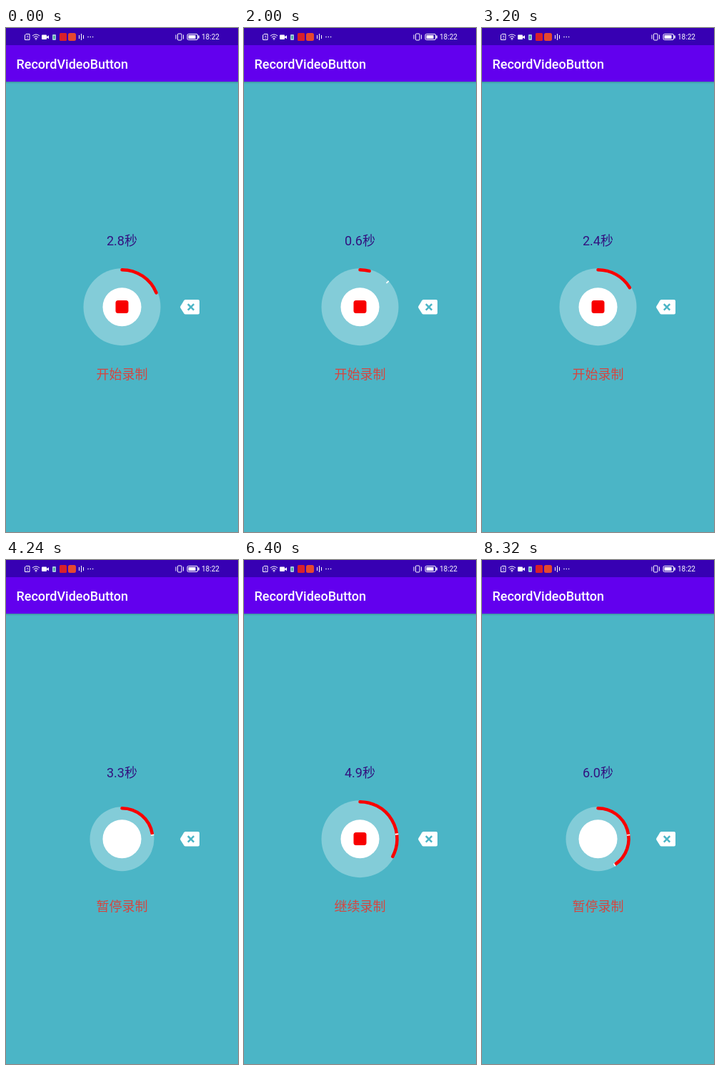
An HTML page that plays this animation: 325 by 705 pixels, repeating every 8400 ms.

```html
<!DOCTYPE html>
<html lang="zh">
<head>
<meta charset="utf-8">
<title>RecordVideoButton</title>
<style>
html, body { margin: 0; width: 100%; height: 100%; overflow: hidden; background: #4bb5c6; }
svg { display: block; width: 100%; height: 100%; }
text { font-family: Roboto, "Noto Sans CJK SC", "Noto Sans CJK", sans-serif; }
.big { font-size: 18px; text-anchor: middle; }
.line { fill: none; stroke: #fff; stroke-width: 1; }
#arcs path { fill: none; stroke-width: 4.5; }
.red { stroke: #f80000; stroke-linecap: round; }
.tick { stroke: #fff; }
</style>
</head>
<body>
<svg viewBox="0 0 325 705" preserveAspectRatio="none">
  <defs>
    <linearGradient id="shade" x2="0" y2="1">
      <stop stop-color="#000" stop-opacity=".2"/>
      <stop offset="1" stop-color="#000" stop-opacity="0"/>
    </linearGradient>
  </defs>
  <rect width="325" height="705" fill="#4bb5c6"/>
  <rect y="75" width="325" height="3" fill="url(#shade)"/>
  <rect y="24" width="325" height="51" fill="#6200ee"/>
  <rect width="325" height="24" fill="#3700b3"/>

  <g id="status" fill="#fff">
    <path class="line" d="M28 8.5h5v8h-6.5v-6.500z"/>
    <path class="line" d="M30 10.500v2.500M30 14v1"/>
    <path class="line" d="M37 11q5-4 10 0M38.700 13q3.300-2.600 6.600 0M40.300 15q1.700-1.400 3.400 0"/>
    <circle cx="42" cy="16" r=".8"/>
    <rect x="50" y="9.500" width="7" height="6.500" rx="1"/>
    <path d="M56.500 12.500l3.500-2.300v5l-3.500-2.300z"/>
    <rect x="65" y="9" width="5" height="8" rx="1" fill="#a5c8df"/>
    <rect x="66.500" y="11" width="2" height="4" fill="#3da88b"/>
    <rect x="75" y="7" width="10" height="11" rx="1.500" fill="#d9202b"/>
    <rect x="87" y="7" width="11" height="11" rx="2.500" fill="#e5482f"/>
    <path class="line" d="M102.500 10v5M105.500 8v9M108.500 10v5"/>
    <circle cx="115" cy="12.500" r=".8"/><circle cx="118.300" cy="12.500" r=".8"/><circle cx="121.600" cy="12.500" r=".8"/>
    <rect class="line" x="240.500" y="8" width="5.500" height="9" rx="1"/>
    <path class="line" d="M238 9.500v6M248.500 9.500v6"/>
    <rect class="line" x="254" y="8.500" width="14.500" height="8" rx="1.500"/>
    <rect x="255.500" y="10" width="10" height="5"/>
    <rect x="269.300" y="10.500" width="1.500" height="4"/>
    <text x="274" y="16" font-size="10">18:22</text>
  </g>

  <text x="14.500" y="56.500" font-size="18" font-weight="500" fill="#fff">RecordVideoButton</text>
  <text id="time" class="big" x="162.500" y="304" fill="#33127f"></text>
  <text id="label" class="big" x="162.500" y="491" fill="#d6453f"></text>

  <circle id="ring" cx="162.500" cy="390.200" fill="#fff" fill-opacity=".31"/>
  <circle cx="162.500" cy="390.200" r="27" fill="#fff"/>
  <rect id="stop" x="153.500" y="381" width="18" height="18" rx="3.500" fill="#f80000"/>
  <g id="arcs"></g>

  <path d="M251.500 380H269q2 0 2 2v16.500q0 2-2 2H251.500q-1.300 0-2.200-1.200l-4.800-7.600q-.8-1.400 0-2.800l4.800-7.600q.9-1.300 2.200-1.300z" fill="#fff"/>
  <path d="M254.800 386.200l8.400 8.400m0-8.400l-8.400 8.400" stroke="#4bb5c6" stroke-width="2.500"/>
</svg>
<script>
const LOOP = 8400, STEP = 80, RATE = 1.53 / 1000, DEG = 360 / 15, MIN = 2, GROW = 300;
const CX = 162.5, CY = 390.2;
// takes: start time, seconds already recorded, seconds at the end, label, joints
const takes = [
  { at: -1840, from: 0, to: 3.1, label: '开始录制', cuts: [] },
  { at: 1600, from: 0, to: 3.34, label: '开始录制', cuts: [] },
  { at: 5360, from: 3.34, to: 6.04, label: '继续录制', cuts: [3.34] }
];
const CLEAR = 1280;
const $ = id => document.getElementById(id);
const ease = x => (1 - Math.cos(Math.PI * Math.min(1, Math.max(0, x)))) / 2;

function arc(a, b, r, cls) {
  const pt = d => {
    const q = d * Math.PI / 180;
    return (CX + r * Math.sin(q)).toFixed(2) + ' ' + (CY - r * Math.cos(q)).toFixed(2);
  };
  return `<path class="${cls}" d="M${pt(a)}A${r} ${r} 0 0 1 ${pt(b)}"/>`;
}

function draw(t) {
  const take = takes.filter(k => k.at <= t).pop();
  const end = take.at + (take.to - take.from) / RATE;
  const on = t < end;
  const cleared = take === takes[0] && t >= CLEAR;
  const secs = cleared ? 0 : Math.min(take.to, take.from + (t - take.at) * RATE);
  const size = on ? ease((t - take.at) / GROW) : 1 - ease((t - end) / GROW);
  const outer = 45 + 9 * size, r = outer - 2;

  $('time').textContent = secs.toFixed(1) + '秒';
  $('label').textContent = on ? take.label : '暂停录制';
  $('ring').setAttribute('r', outer);
  $('stop').style.display = on ? '' : 'none';

  let out = '';
  if (secs < MIN) out += arc(MIN * DEG - 1, MIN * DEG + 1, r, 'tick');
  if (secs > 0) out += arc(0, secs * DEG, r, 'red');
  const cuts = on || cleared ? take.cuts : [...take.cuts, take.to];
  for (const c of cuts) out += arc(c * DEG + 1.3, c * DEG + 3.5, r, 'tick');
  $('arcs').innerHTML = out;
}

const t0 = performance.now();
let last = -1;
function frame() {
  const t = Math.floor((performance.now() - t0) % LOOP / STEP) * STEP;
  if (t !== last) draw(last = t);
  requestAnimationFrame(frame);
}
frame();
</script>
</body>
</html>
```
